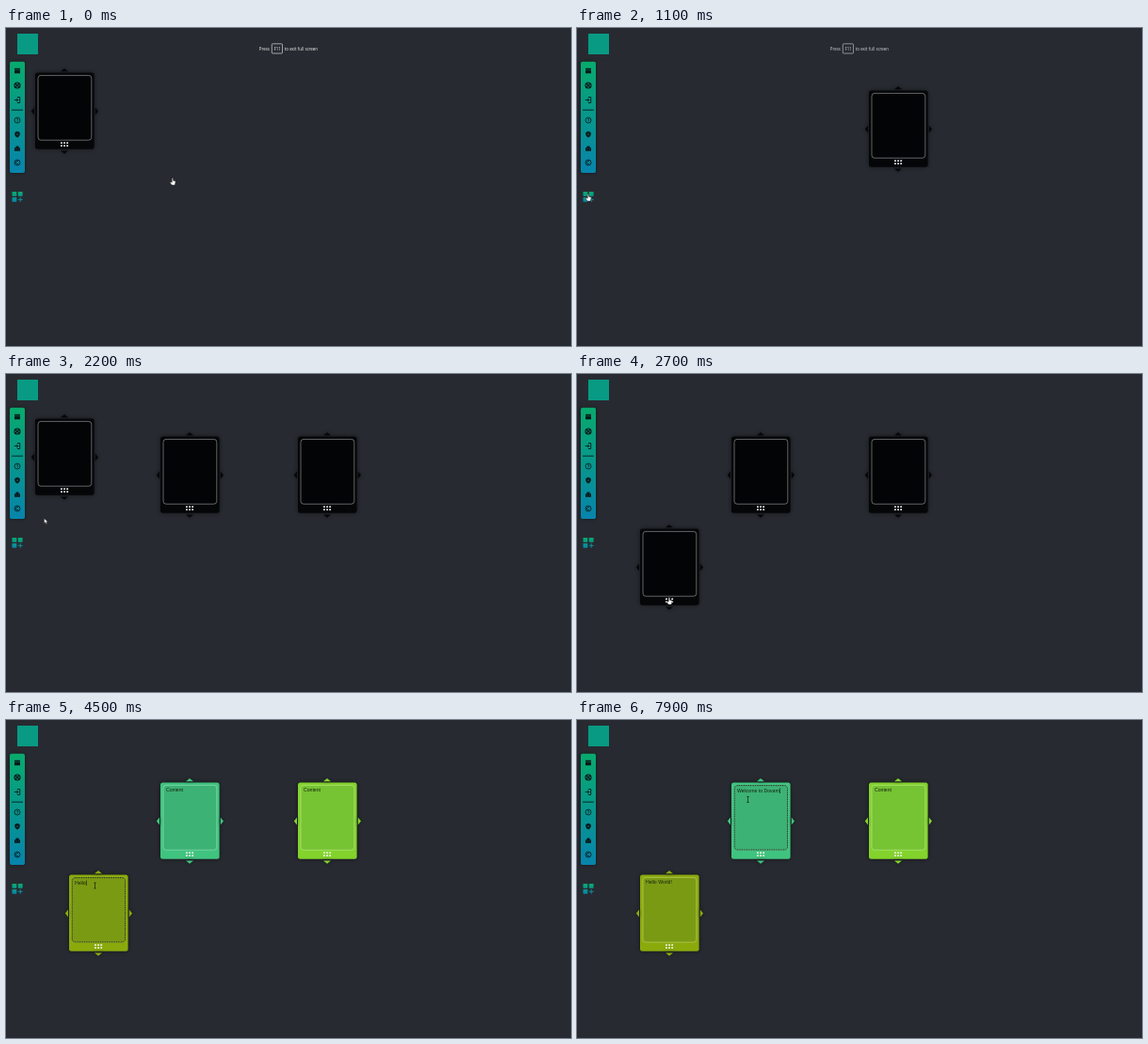
These frames come from a looping animation (600 px wide and 338 px high, 8000 ms). An HTML page with a canvas:

```html
<!DOCTYPE html>
<html lang="en">
<head>
<meta charset="utf-8">
<title>Card board</title>
<style>
html, body { margin: 0; width: 600px; height: 338px; overflow: hidden; background: #272b31; }
canvas { display: block; }
</style>
</head>
<body>
<canvas id="stage" width="600" height="338"></canvas>
<script>
const ctx = document.getElementById('stage').getContext('2d');
const LOOP = 8000, STEP = 100;
const INK = '#07191b';
const SANS = '5.15px "Liberation Sans", Arial, sans-serif';

// Pointer path: time, x, y, shape used until the next key
const pointerKeys = [
  [0, 177, 163, hand], [200, 62, 124, hand], [300, 62, 124, hand],
  [800, 341, 143, arrow], [900, 341, 143, arrow],
  [1100, 12, 180, hand], [1200, 12, 180, arrow], [1400, 62, 124, hand],
  [1800, 195, 143, arrow], [2000, 12, 180, hand], [2100, 12, 180, arrow],
  [2200, 40.5, 153.5, arrow], [2300, 62, 124, hand], [2700, 98, 241, hand],
  [2900, 98, 241, arrow], [3200, 195, 143, arrow], [3400, 318, 144.5, arrow],
  [3500, 341, 143, hand], [3600, 341, 143, arrow], [3900, 94.5, 176, beam],
  [5300, 94.5, 176, arrow], [5600, 181.5, 84.5, beam]
];

const START = [31, 47];
const cards = [
  { born: -1, drag: [300, 800], end: [310, 66], paint: 3600, frame: '#83d32c', field: '#76c333', edge: '#b5e582' },
  { born: 1200, drag: [1400, 1800], end: [164, 66], paint: 3200, frame: '#3fc47f', field: '#3cb274', edge: '#8edcb3',
    focus: [5700, 8000], typing: 6400, text: 'Welcome to Dovam' },
  { born: 2100, drag: [2300, 2700], end: [67, 164], paint: 2900, frame: '#8aaa0c', field: '#7b9a14', edge: '#bccb62',
    focus: [3900, 5400], typing: 4100, text: 'Hello World!' }
];

const clamp = v => Math.max(0, Math.min(1, v));
const mix = (a, b, p) => a + (b - a) * p;

function box(x, y, w, h, r, fill, stroke, width = 0.7) {
  ctx.beginPath();
  ctx.roundRect(x, y, w, h, r);
  if (fill) { ctx.fillStyle = fill; ctx.fill(); }
  if (stroke) { ctx.strokeStyle = stroke; ctx.lineWidth = width; ctx.stroke(); }
}

function shape(path, fill, stroke, width = 1) {
  const p = new Path2D(path);
  if (fill) { ctx.fillStyle = fill; ctx.fill(p); }
  if (stroke) { ctx.strokeStyle = stroke; ctx.lineWidth = width; ctx.stroke(p); }
}

function at(x, y, draw) {
  ctx.save();
  ctx.translate(x, y);
  draw();
  ctx.restore();
}

function write(text, x, y, font, color) {
  ctx.font = font;
  ctx.fillStyle = color;
  ctx.fillText(text, x, y);
}

function hand() {
  shape('M-.8 -3.2Q0 -4 .6 -3.2V-.8L2.4 -.4Q3.2 0 3 1L2.4 4H-1L-2.8 1.2Q-2.7 .2 -1.8 .6L-.8 1.2Z', '#fff', '#111', 0.5);
}

function arrow() {
  shape('M0 0V5.2L1.3 4.1L2.2 6L3.1 5.6L2.3 3.8H4Z', '#fff', '#111', 0.4);
}

function beam() {
  shape('M-1.2 -3H1.2M0 -3V3M-1.2 3H1.2', null, '#18200f', 0.7);
}

function drawPointer(t) {
  const i = pointerKeys.findLastIndex(k => k[0] <= t);
  const a = pointerKeys[i], b = pointerKeys[i + 1] || a;
  const p = b === a ? 0 : (t - a[0]) / (b[0] - a[0]);
  at(mix(a[1], b[1], p), mix(a[2], b[2], p), a[3]);
}

function drawContent(card, t, focused) {
  const typed = card.typing && t >= card.typing;
  const text = typed ? card.text.slice(0, (t - card.typing) / STEP + 1) : 'Content';
  const y = focused ? 11 : 10.3;
  ctx.font = SANS;
  const w = ctx.measureText(text).width;
  if (focused && !typed) box(5.7, 6.2, w + 0.6, 6, 0, '#246fc0');
  write(text, 6, y, SANS, focused && !typed ? '#fff' : '#15240f');
  if (focused && typed) box(6.2 + w, 6.5, 0.6, 5.6, 0, '#0a0f08');
}

function drawCard(card, t) {
  if (t < card.born) return;
  const p = clamp((t - card.drag[0]) / (card.drag[1] - card.drag[0]));
  const painted = t >= card.paint;
  const focused = card.focus && t >= card.focus[0] && t < card.focus[1];
  const frame = painted ? card.frame : '#050608';
  at(mix(START[0], card.end[0], p), mix(START[1], card.end[1], p), () => {
    ctx.shadowColor = 'rgba(0,0,0,.55)';
    ctx.shadowBlur = 5;
    box(0, 0.4, 62.6, 81.4, 2.5, frame);
    shape('M27 -.8L31 -4L35 -.8ZM27 83.6L31 86.8L35 83.6ZM-1 37.5L-4.2 41.5L-1 45.5ZM63.8 37.5L67 41.5L63.8 45.5Z', frame);
    ctx.shadowColor = 'transparent';
    box(3, 3.4, 56.8, 68.8, 3, painted ? card.field : '#030406', painted ? card.edge : '#8c8e90', 0.7);
    if (focused) {
      ctx.setLineDash([1.2, 0.5]);
      box(3.2, 3.6, 56.4, 68.4, 3, null, '#142010', 0.9);
      ctx.setLineDash([]);
    }
    for (let i = 0; i < 6; i++) {
      box(27 + i % 3 * 3.1, 74.2 + (i > 2) * 3, 1.9, 1.9, 0.5, painted ? '#edf4e4' : '#e4e4e4');
    }
    if (painted) drawContent(card, t, focused);
  });
}

function gradient(y0, y1, a, b) {
  const g = ctx.createLinearGradient(0, y0, 0, y1);
  g.addColorStop(0, a);
  g.addColorStop(1, b);
  return g;
}

const ring = 'M-3 0A3 3 0 1 1 3 0A3 3 0 1 1 -3 0Z';
const icons = [
  [45.5, () => { box(-3, -2.7, 6, 1.6, 0.5, INK); box(-3, -0.7, 6, 3.5, 0.5, INK); }],
  [61, () => { shape(ring, null, INK, 1.1); shape('M-2 -2L2 2M-2 2L2 -2', null, INK, 1.2); }],
  [76.5, () => shape('M0 -3H2.7V3H0M-3.2 0H1M-.8 -1.8L1 0L-.8 1.8', null, INK, 0.9)],
  [98, () => {
    shape(ring, null, INK, 0.8);
    shape('M-1 -.8Q0 -2.5 1 -.8Q1 0 0 .3V.8M0 1.3V2', null, INK, 0.7);
  }],
  [113, () => { shape('M0 -3.2L2.7 -2.1V.2Q2.3 2.4 0 3.4Q-2.3 2.4 -2.7 .2V-2.1Z', INK); box(-0.5, -0.8, 1, 1.6, 0.4, '#089391'); }],
  [128, () => {
    shape('M-3 2.8V-.4L-1.5 -1V-2.6H1.5V-1L3 -.4V2.8Z', INK);
    box(-1.6, 0.3, 0.9, 0.9, 0.4, '#088d98');
    box(0.7, 0.3, 0.9, 0.9, 0.4, '#088d98');
  }],
  [143, () => {
    shape(ring, null, INK, 0.8);
    shape('M1.2 -1.1A1.6 1.6 0 1 0 1.2 1.1', null, INK, 0.8);
  }]
];

function drawSidebar() {
  box(12, 6, 22, 22, 0, '#089a83');
  ctx.shadowColor = 'rgba(0,0,0,.5)';
  ctx.shadowBlur = 4;
  box(4, 35.7, 16, 118.3, 2, gradient(36, 154, '#08aa6d', '#0784ac'));
  ctx.shadowColor = 'transparent';
  for (const [y, draw] of icons) at(12, y, draw);
  box(6, 86.7, 12, 0.9, 0, INK);
  const tint = gradient(174, 185, '#08aa70', '#0786aa');
  for (const [x, y] of [[6.5, 174], [12.8, 174], [6.5, 180]]) box(x, y, 4.8, 4.7, 0.6, tint);
  shape('M15.2 180V184.8M12.8 182.4H17.6', null, tint, 1);
}

function drawHint(t) {
  const font = '4.45px "Open Sans", "Noto Sans", sans-serif';
  ctx.globalAlpha = 1 - clamp((t - 1000) / 600);
  write('Press', 268.8, 23.5, font, '#f2f2f2');
  box(282.3, 16.8, 11.2, 10.2, 1, null, '#d8d8d8', 0.7);
  write('F11', 284.4, 23.5, font, '#f2f2f2');
  write('to exit full screen', 295.8, 23.5, font, '#f2f2f2');
  ctx.globalAlpha = 1;
}

function render(now) {
  const t = Math.floor(now % LOOP / STEP) * STEP;
  ctx.fillStyle = '#272b31';
  ctx.fillRect(0, 0, 600, 338);
  drawSidebar();
  drawHint(t);
  for (const card of cards) drawCard(card, t);
  drawPointer(t);
}

const began = performance.now();
function tick() {
  render(performance.now() - began);
  requestAnimationFrame(tick);
}
tick();
</script>
</body>
</html>
```
